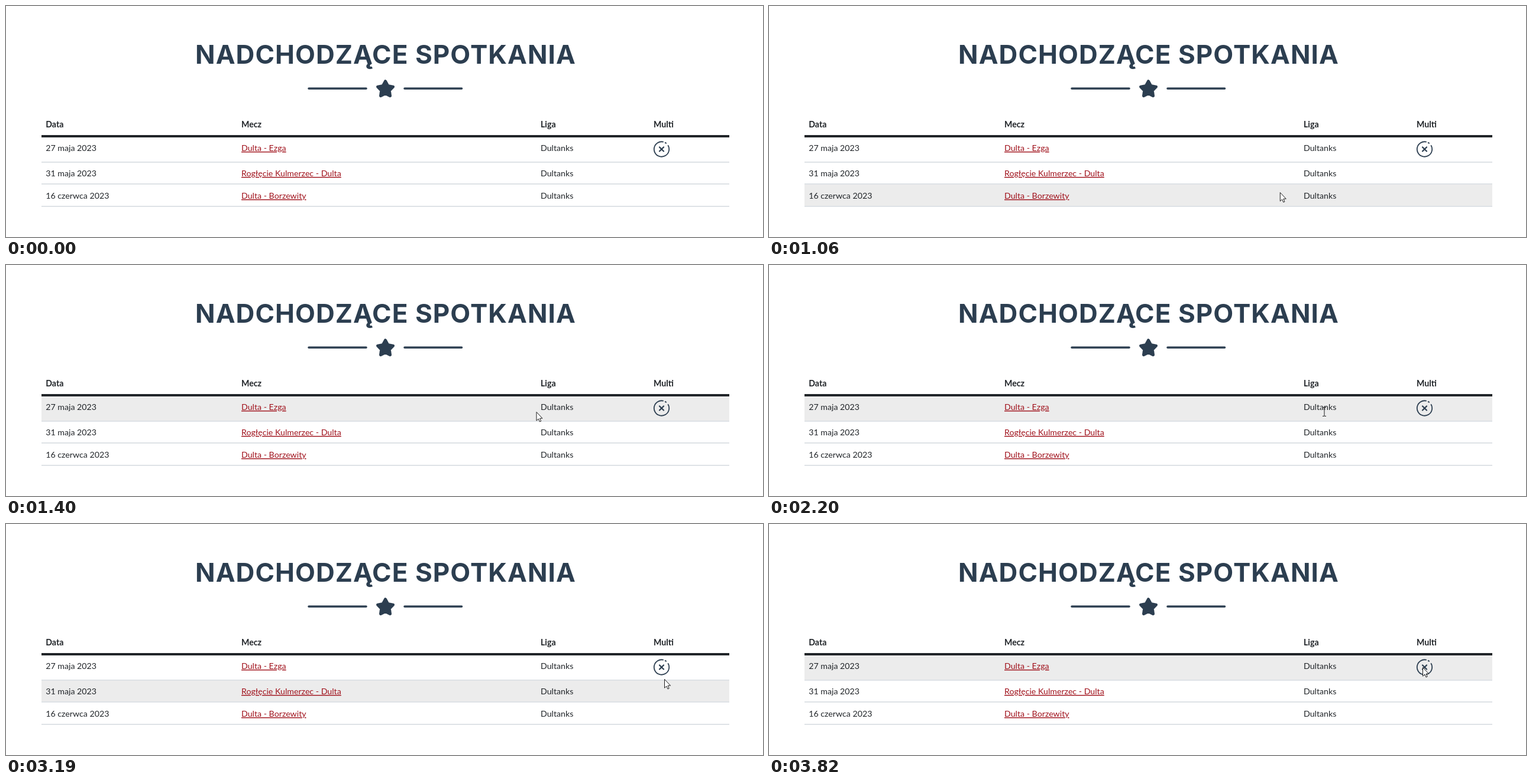
Animation, 1280 px wide and 392 px high, one loop 4.48 s. Source, as an HTML page:

```html
<!DOCTYPE html>
<html lang="pl">
<head>
<meta charset="utf-8">
<title>Nadchodzące spotkania</title>
<style>
html, body { margin: 0; width: 100%; height: 100%; overflow: hidden; background: #fff; }
svg { display: block; width: 1280px; height: 392px; }
text { font: 14.2px Lato, sans-serif; fill: #212529; }
.title { font: 700 44px Inter, sans-serif; letter-spacing: .024em; fill: #2c3e50; text-anchor: middle; }
.head { font-weight: 700; }
.link { fill: #a0121c; text-decoration: underline; }
.ink { fill: #2c3e50; stroke: #2c3e50; stroke-linecap: round; stroke-linejoin: round; }
.icon { fill: none; stroke: #2c3e50; }
</style>
</head>
<body>
<svg viewBox="0 0 1280 392">
  <text class="title" x="642" y="98">NADCHODZĄCE SPOTKANIA</text>
  <g class="ink" stroke-width="3.6">
    <path d="M512 140h97M674 140h96.500"/>
    <path transform="translate(641.5 141.300)" stroke-width="5"
      d="M0-13.700 4.200-5.800 13-4.200 6.800 2.200 8 11.100 0 7.200-8 11.100-6.800 2.200-13-4.200-4.200-5.800Z"/>
  </g>
  <g id="table"></g>
  <path d="M60 221H1223" stroke="#212529" stroke-width="4"/>
  <g class="icon" transform="translate(1108.5 243)">
    <circle r="12.700" stroke-width="1.800" pathLength="360" stroke-dasharray="317 11 14 18" transform="rotate(-32)"/>
    <path d="M-3.500-3.500 3.500 3.500M3.500-3.500-3.500 3.500" stroke-width="2.300" stroke-linecap="round"/>
  </g>
  <g id="cursor">
    <path id="arrow" d="M.5.5V15.200L3.800 12.100 6 17 8.200 16 6.100 11.200H10.500Z" fill="#fff" stroke="#1c1c1c"/>
    <path id="beam" d="M-3-7.500h2.500l.5.500.5-.5H3M0-7V7M-3 7.500h2.500L0 7l.5.500H3" fill="none" stroke="#1c1c1c"/>
  </g>
</svg>
<script>
const LOOP = 4480;
const columns = [67.2, 398, 904, 1095];
const rows = [
  { top: 223, bottom: 264, base: 246, cells: ['27 maja 2023', 'Dulta - Ezga', 'Dultanks'] },
  { top: 266, bottom: 301, base: 289, cells: ['31 maja 2023', 'Rogłęcie Kulmerzec - Dulta', 'Dultanks'] },
  { top: 303, bottom: 339, base: 327, cells: ['16 czerwca 2023', 'Dulta - Borzewity', 'Dultanks'] }
];

// Pointer strokes: a smooth path through the points, sampled in equal steps
const strokes = [
  { start: 920, end: 1400, steps: 7, points: [[837, 367], [868, 308], [889.5, 266.5], [896.5, 249]] },
  { start: 1400, end: 1540, steps: 2, points: [[896.5, 249], [896.5, 244.5]] },
  { start: 2200, end: 2700, steps: 7, points: [[939, 249], [1020, 247], [1085, 253], [1115, 261]] },
  { start: 2770, end: 3820, steps: 15,
    points: [[1118, 250], [1081, 254], [1113, 263], [1104, 236], [1089, 252], [1105, 243]] }
];

const byId = id => document.getElementById(id);
const table = byId('table'), cursor = byId('cursor'), arrow = byId('arrow'), beam = byId('beam');

function add(tag, attributes, content = '') {
  const node = document.createElementNS('http://www.w3.org/2000/svg', tag);
  for (const name in attributes) node.setAttribute(name, attributes[name]);
  node.textContent = content;
  return table.appendChild(node);
}

['Data', 'Mecz', 'Liga', 'Multi'].forEach((label, i) =>
  add('text', { class: 'head', x: columns[i], y: 206 }, label));

for (const row of rows) {
  row.band = add('rect', { x: 60, y: row.top, width: 1163, height: row.bottom - row.top, fill: '#ececec' });
  add('rect', { x: 60, y: row.bottom, width: 1163, height: 2, fill: '#dee2e6' });
  row.cells.forEach((label, i) =>
    add('text', { class: i === 1 ? 'link' : 'cell', x: columns[i], y: row.base }, label));
}

function spline(points, u) {
  const last = points.length - 1;
  const i = Math.min(Math.floor(u * last), last - 1);
  const s = u * last - i;
  const at = k => points[Math.max(0, Math.min(last, k))];
  return [0, 1].map(axis => {
    const [a, b, c, d] = [i - 1, i, i + 1, i + 2].map(k => at(k)[axis]);
    return b + s / 2 * (c - a + s * (2 * a - 5 * b + 4 * c - d + s * (3 * (b - c) + d - a)));
  });
}

function pointerAt(t) {
  const stroke = strokes.findLast(s => t >= s.start);
  if (!stroke) return null;
  const { start, end, steps, points } = stroke;
  const step = Math.floor((t - start + 4) / (end - start) * steps);
  return spline(points, Math.min(1, step / steps));
}

function show(node, visible) {
  node.setAttribute('visibility', visible ? 'visible' : 'hidden');
}

function draw(t) {
  const pointer = pointerAt(t);
  const [x, y] = pointer || [0, 0];
  const overText = x > 904 && x < 960 && y < 262;
  cursor.setAttribute('transform', `translate(${x} ${y})`);
  show(arrow, pointer && !overText);
  show(beam, pointer && overText);
  const hovered = rows.find(row => y < row.bottom - 2);
  for (const row of rows) show(row.band, pointer && row === hovered);
}

const begin = performance.now();
function tick() {
  draw((performance.now() - begin) % LOOP);
  requestAnimationFrame(tick);
}
tick();
</script>
</body>
</html>
```
